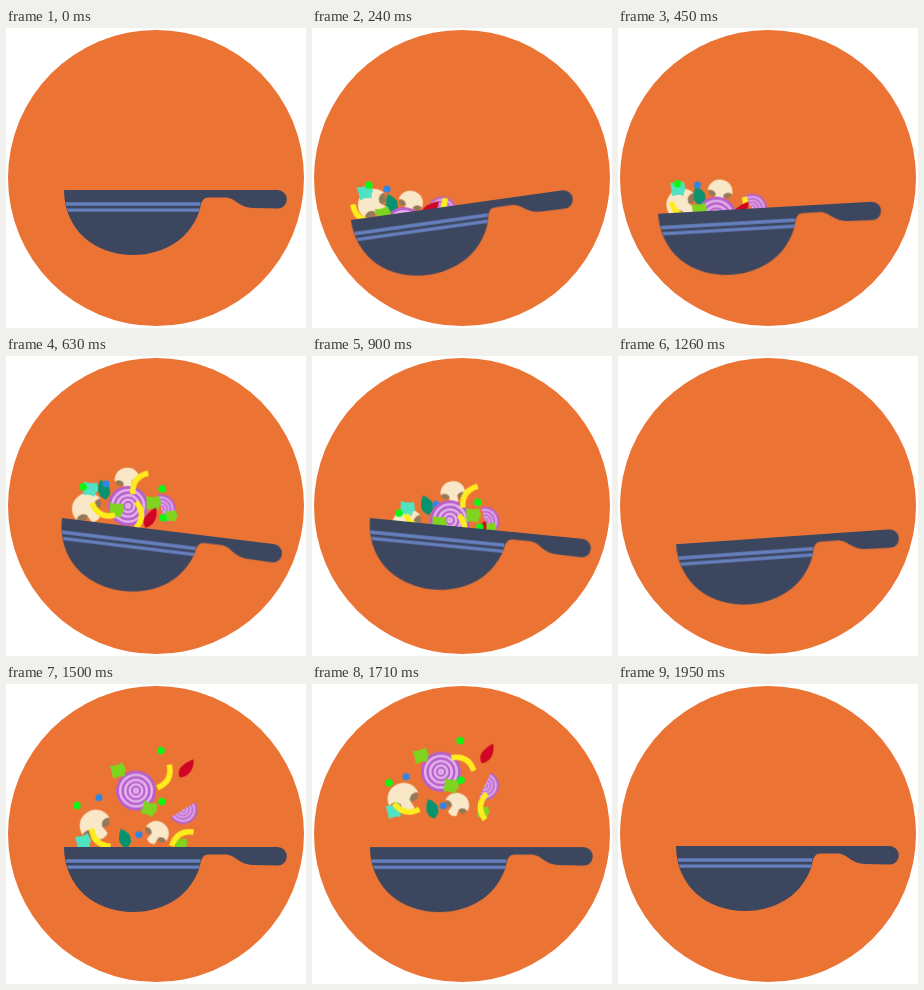
These frames come from a looping animation (300 px wide and 300 px high, 2.07 s). An HTML page without scripts:

```html
<!DOCTYPE html>
<html lang="en">
<head>
<meta charset="utf-8">
<title>Pan toss</title>
<style>
html, body { margin: 0; width: 100%; height: 100%; overflow: hidden; background: #fff; }
svg { display: block; width: 100%; height: 100%; }

.pan { transform-origin: 58px 162px; animation: pan 2070ms infinite; }

/* Poses: h resting in the bowl, a swung back, b small toss, d high toss */
.food > * {
  --h: translate(125px, 192px) rotate(0deg);
  --a: translate(110px, 217px) rotate(0deg);
  --b: translate(125px, 196px) rotate(0deg);
  --drift: 17px, 13px;
  animation: food 2070ms infinite;
}
.food > .l { --h: translate(98px, 190px) rotate(0deg); }
.food > .r { --h: translate(157px, 188px) rotate(0deg); }

@keyframes pan {
  0% { transform: translate(0, 0) rotate(0deg); animation-timing-function: cubic-bezier(.45, 0, .75, .8); }
  11.594% { transform: translate(-19px, 30px) rotate(-8deg); animation-timing-function: ease-out; }
  15.942% { transform: translate(-26px, 36px) rotate(-8.5deg); animation-timing-function: ease-in-out; }
  30.435% { transform: translate(-2px, 0) rotate(7deg); animation-timing-function: ease-in-out; }
  43.478% { transform: translate(0, 0) rotate(5.6deg); animation-timing-function: ease-in; }
  52.174% { transform: translate(0, 4px) rotate(1.5deg); animation-timing-function: linear; }
  60.87% { transform: translate(0, 26px) rotate(-4deg); animation-timing-function: ease-out; }
  65.217% { transform: translate(0, 46px) rotate(-6deg); animation-timing-function: ease-in-out; }
  72.464%, 82% { transform: translate(0, 1px) rotate(0deg); animation-timing-function: ease-in-out; }
  88.9% { transform: translate(0, 8px) rotate(0deg); animation-timing-function: ease-in-out; }
  94.203%, 100% { transform: translate(0, 0) rotate(0deg); }
}
@keyframes food {
  0% { transform: translate(0, 0) var(--h); animation-timing-function: ease-in-out; }
  11.594% { transform: translate(0, 0) var(--a); animation-timing-function: ease-out; }
  15.942% { transform: translate(-6px, 4px) var(--a); animation-timing-function: ease-in; }
  26.087% { transform: translate(-5px, 17px) var(--b); animation-timing-function: linear; }
  30.435% { transform: translate(0, 0) var(--b); animation-timing-function: ease-out; }
  33.816% { transform: translate(5px, -7px) var(--b); animation-timing-function: ease-in; }
  43.478% { transform: translate(var(--drift)) var(--b); animation-timing-function: linear; }
  52.174% { transform: translate(0, 3px) var(--h); animation-timing-function: linear; }
  60.87% { transform: translate(0, 22px) var(--h); animation-timing-function: ease-out; }
  65.217% { transform: translate(0, 42px) var(--h); animation-timing-function: linear; }
  72.464% { transform: translate(0, 0) var(--d); animation-timing-function: cubic-bezier(.2, .5, .5, 1); }
  76.812% { transform: translate(0, -52px) var(--d); animation-timing-function: cubic-bezier(.5, 0, .85, .7); }
  88.9% { transform: translate(0, 5px) var(--h); }
  94.203%, 100% { transform: translate(0, 0) var(--h); }
}
</style>
</head>
<body>
<svg viewBox="0 0 300 300">
  <defs>
    <g id="mushroom">
      <path fill="#94785a" d="M-15,1C-15,9 -8,10 -3,5H3C8,10 15,9 15,1Z"/>
      <path fill="#f8e8c8" d="M-16,2C-16,-20 16,-20 16,2C11,-1 7,1 5,5L6,14Q0,18 -6,14L-5,5C-7,1 -11,-1 -16,2Z"/>
    </g>
    <g id="onion">
      <circle r="20" fill="#b75fcb"/>
      <g fill="none" stroke="#e3b0ec" stroke-width="2.6">
        <circle r="15.8"/><circle r="10.8"/><circle r="6.2"/><circle r="1.8"/>
      </g>
    </g>
    <clipPath id="top"><path d="M-22,-22H22V0H-22Z"/></clipPath>
    <g id="half"><use href="#onion" transform="scale(.72)" clip-path="url(#top)"/></g>
    <path id="chunk" d="M-7,-4Q0,-4 4,-7L7,-1Q5,2 6,5Q0,4 -4,7Q-5,1 -7,-4Z" stroke-width="2" stroke-linejoin="round"/>
    <path id="strip" d="M-3,-13Q8,0 -3,13" fill="none" stroke="#ffec1c" stroke-width="5.5"/>
    <path id="leaf" fill="#08926f" d="M-4,-10Q7,-6 6,4L2,10Q-6,7 -6,0Q-6,-6 -4,-10Z"/>
    <path id="chili" fill="#d00424" d="M1,-12Q7,-4 5,4Q3,9 0,11Q-5,8 -5,2Q-4,-5 1,-12Z"/>
    <circle id="pea" r="3.8" fill="#0cf814"/>
    <circle id="berry" r="3.6" fill="#2f86e4"/>
  </defs>

  <circle cx="150" cy="150" r="148" fill="#eb7435"/>

  <g class="food">
    <g class="l" style="--a:translate(61px,176px) rotate(-53deg);--b:translate(81px,152px) rotate(-42deg);--d:translate(89px,142px) rotate(-33deg);--drift:14px,16px"><use href="#mushroom"/></g>
    <g style="--a:translate(99px,174px) rotate(20deg);--b:translate(121px,123px) rotate(-6deg);--d:translate(151px,150px) rotate(35deg);--drift:20px,13px"><use href="#mushroom" transform="scale(.78)"/></g>
    <g class="l" style="--a:translate(53px,164px) rotate(0deg);--b:translate(84px,133px) rotate(20deg);--d:translate(77px,159px) rotate(0deg);--drift:11px,19px"><use href="#chunk" fill="#50e3c2" stroke="#50e3c2"/></g>
    <g style="--a:translate(80px,176px) rotate(0deg);--b:translate(98px,134px) rotate(0deg);--d:translate(119px,156px) rotate(0deg);--drift:17px,15px"><use href="#leaf"/></g>
    <g class="l" style="--a:translate(75px,161px) rotate(0deg);--b:translate(100px,128px) rotate(0deg);--d:translate(93px,115px) rotate(0deg);--drift:24px,20px"><use href="#berry"/></g>
    <g style="--d:translate(133px,152px) rotate(0deg)"><use href="#berry"/></g>
    <g class="r" style="--a:translate(130px,183px) rotate(20deg);--b:translate(155px,153px) rotate(75deg);--d:translate(177px,127px) rotate(149deg);--drift:18px,12px"><use href="#half"/></g>
    <g style="--a:translate(92px,199px) rotate(0deg);--b:translate(122px,150px) rotate(0deg);--d:translate(130px,108px) rotate(0deg);--drift:16px,14px"><use href="#onion"/></g>
    <g fill="#7fd420" stroke="#7fd420" class="l" style="--a:translate(71px,186px) rotate(0deg);--b:translate(110px,154px) rotate(20deg);--d:translate(112px,88px) rotate(0deg)"><use href="#chunk"/></g>
    <g fill="#7fd420" stroke="#7fd420" style="--b:translate(147px,147px) rotate(15deg);--d:translate(143px,126px) rotate(30deg);--drift:14px,12px"><use href="#chunk"/></g>
    <g fill="#7fd420" stroke="#7fd420" class="r" style="--b:translate(165px,160px) rotate(10deg);--d:translate(175px,161px) rotate(20deg);--drift:13px,12px"><use href="#chunk" transform="scale(.8)"/></g>
    <g style="--b:translate(132px,126px) rotate(216deg);--d:translate(160px,95px) rotate(387deg);--drift:24px,13px"><use href="#strip"/></g>
    <g class="r" style="--a:translate(127px,182px) rotate(40deg);--b:translate(133px,159px) rotate(0deg);--d:translate(175px,154px) rotate(237deg)"><use href="#strip"/></g>
    <g class="l" style="--a:translate(49px,187px) rotate(130deg);--b:translate(96px,156px) rotate(118deg);--d:translate(93px,157px) rotate(133deg);--drift:8px,11px"><use href="#strip"/></g>
    <g class="r" style="--a:translate(118px,181px) rotate(45deg);--b:translate(144px,162px) rotate(25deg);--d:translate(180px,86px) rotate(35deg);--drift:24px,13px"><use href="#chili"/></g>
    <g class="l" style="--a:translate(57px,157px) rotate(0deg);--b:translate(77px,131px) rotate(0deg);--d:translate(71px,123px) rotate(0deg);--drift:10px,26px"><use href="#pea"/></g>
    <g style="--b:translate(156px,133px) rotate(0deg);--d:translate(155px,68px) rotate(0deg);--drift:10px,13px"><use href="#pea"/></g>
    <g style="--b:translate(157px,162px) rotate(0deg);--d:translate(156px,119px) rotate(0deg);--drift:11px,9px"><use href="#pea"/></g>
  </g>

  <g class="pan">
    <path fill="#3c475f" d="M58,162H271.5A9.3,9.3 0 0 1 271.5,180.6L247,180C231,179 230,169.5 219,169.5H202Q195,169.5 194,181C186,208 161,227 127,227C88,227 58,201 58,162Z"/>
    <path fill="#6680bf" d="M59.5,174.3H194.5L194,177.7H60.2ZM61,180.4H194L193,183.8H62Z"/>
  </g>
</svg>
</body>
</html>
```
